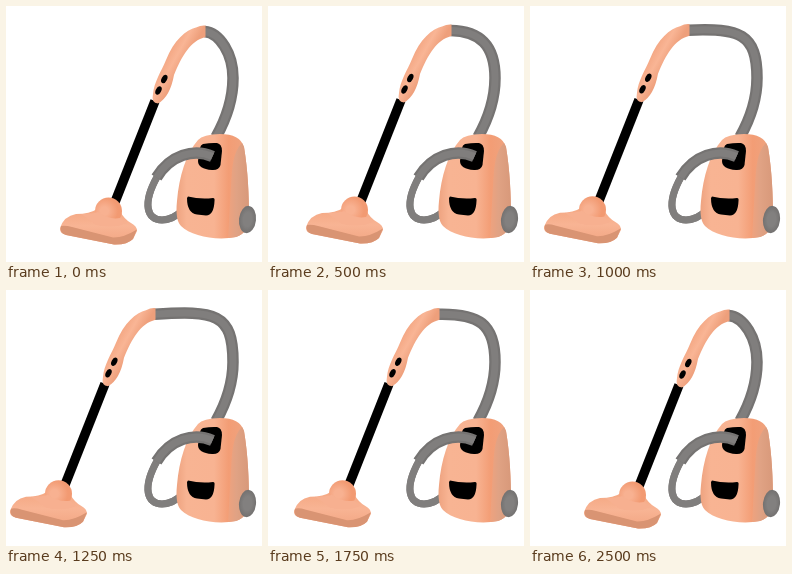
Animation of 256 by 256 pixels, one loop 2750 ms. Source, as an HTML page:

```html
<!DOCTYPE html>
<html lang="en">
<head>
<meta charset="utf-8">
<title>Vacuum cleaner</title>
<style>
  html, body { margin: 0; width: 100%; height: 100%; overflow: hidden; background: #fff; }
  svg { display: block; width: 100vw; height: 100vh; }
  .hose { fill: none; stroke: #757372; stroke-width: 11.5; }
  .hose + .hose { stroke: #807e7d; stroke-width: 7; }
</style>
</head>
<body>
<svg viewBox="0 0 256 256">
  <defs>
    <linearGradient id="shell">
      <stop offset="0" stop-color="#eea380"/>
      <stop offset=".14" stop-color="#f8b493"/>
      <stop offset=".52" stop-color="#f8b392"/>
      <stop offset=".72" stop-color="#f39d75"/>
      <stop offset="1" stop-color="#eda582"/>
    </linearGradient>
    <linearGradient id="side">
      <stop offset="0" stop-color="#efa27e"/>
      <stop offset=".4" stop-color="#e0a284"/>
      <stop offset="1" stop-color="#d8997a"/>
    </linearGradient>
    <linearGradient id="grip" gradientUnits="userSpaceOnUse" x1="160" y1="48" x2="178" y2="58">
      <stop offset="0" stop-color="#f3a581"/>
      <stop offset=".5" stop-color="#f9b595"/>
      <stop offset="1" stop-color="#ee9f7b"/>
    </linearGradient>
    <linearGradient id="nozzle" x2="0" y2="1">
      <stop offset="0" stop-color="#f4a680"/>
      <stop offset=".5" stop-color="#f8b494"/>
      <stop offset="1" stop-color="#f2a582"/>
    </linearGradient>
    <radialGradient id="dome" cx=".35">
      <stop offset=".3" stop-color="#f8b191"/>
      <stop offset="1" stop-color="#f29a72"/>
    </radialGradient>
    <radialGradient id="wheel">
      <stop offset=".5" stop-color="#82807f"/>
      <stop offset="1" stop-color="#737170"/>
    </radialGradient>
  </defs>

  <path class="hose upper"/><path class="hose upper"/>
  <path class="hose loop"/><path class="hose loop"/>

  <g id="wand">
    <path d="M149 95L109 196" stroke="#000" stroke-width="9.500"/>
    <path fill="url(#grip)" d="M190 21.500Q195 19 199.500 19.500L199.500 31C184 35 176 50 168 69Q164 91 152 97.500Q145 97 147 88C148 76 155 66 160 54C168 34 180 24 190 21.500Z"/>
    <ellipse cx="158.300" cy="73" rx="2.700" ry="4.500" transform="rotate(27 158.300 73)"/>
    <ellipse cx="152.500" cy="84.500" rx="2.700" ry="4.500" transform="rotate(27 152.500 84.500)"/>
    <path fill="url(#nozzle)" d="M54 222Q58 210 70 208Q84 208 91 203Q103 199 114 205Q118 213 125 217Q131 220 131 225L127 233Q121 239 108 238.500L60 229Q53 227 54 222Z"/>
    <ellipse cx="102.500" cy="205" rx="13.500" ry="13.500" fill="url(#dome)"/>
    <path fill="#f7b090" d="M75 208Q86 208 92 206Q103 214 114 212Q117 215 121 217Q108 223 90 219Z"/>
    <path fill="#d99473" d="M55 220Q59 219 66 221L107 231.500Q117 232 131 223.500L127 233Q121 239 108 238.500L60 229Q53 227 55 220Z"/>
  </g>

  <path fill="url(#shell)" d="M192 134Q197 128.500 214 128Q234 128 238 141C242 165 243 190 243 210Q243 227 230 231C210 235 185 230 175 220Q169 214 171 195C173 170 180 148 192 134Z"/>
  <path fill="url(#side)" d="M236 137C227 146 226 160 225 180L222 232L230 231Q243 227 243 210C243 190 242 165 238 141Z"/>
  <path d="M197 138Q205 136.500 211 137Q216 138 216 145L214.500 159Q213 164.500 206 164Q192 163 192 155L194 142Q194.500 139 197 138Z"/>
  <path d="M182 190.500Q194 193.500 207 192Q209 192 208.500 195Q208 209 200 209.500L191 208.500Q181 207 181 192Z"/>
  <ellipse cx="241.500" cy="213.500" rx="8.500" ry="13.700" fill="url(#wheel)" transform="rotate(6 241.500 213.500)"/>
  <path class="hose outlet"/><path class="hose outlet"/>
</svg>
<script>
  const STEP = 250, COUNT = 11;
  const reach = [0, 8, 16, 28, 40, 50];
  const wand = document.getElementById('wand');

  function setPath(selector, d) {
    document.querySelectorAll(selector).forEach(el => el.setAttribute('d', d));
  }

  function pose(step) {
    const dx = -reach[Math.min(step, COUNT - 1 - step)];
    const dy = Math.max(dx / 16, -1.3);
    wand.setAttribute('transform', `translate(${dx} ${dy})`);
    setPath('.upper', `M${198.5 + dx} ${25.5 + dy}
      C${214 + dx * .1} ${27 + dx * .13} 227 ${48 + dx * .5} 227 72
      C227 95 219 115 210 131`);
  }

  setPath('.outlet', 'M206.5 150.500C188 142 164 149 150.500 171.500');
  setPath('.loop', 'M151 171C136 198 141 214 156 214C165 214 171 210 178 203');

  function draw(now) {
    pose(Math.floor(now / STEP) % COUNT);
    requestAnimationFrame(draw);
  }
  draw(performance.now());
</script>
</body>
</html>
```
